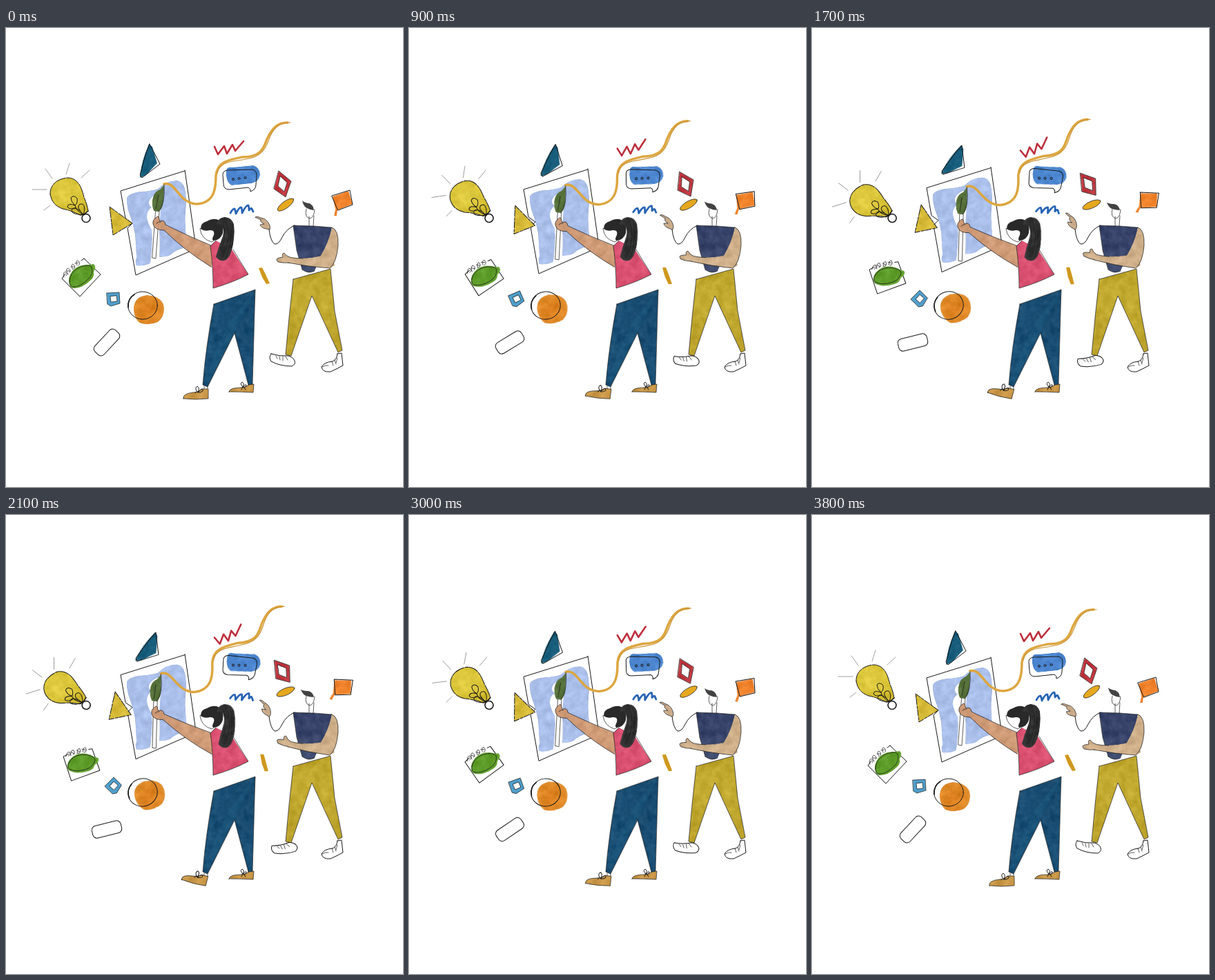
Animation, 575 px wide and 665 px high, one loop 3900 ms. Source, as an HTML page:

```html
<!DOCTYPE html>
<html lang="en">
<head>
<meta charset="utf-8">
<title>Creative team</title>
<style>
html, body { margin: 0; width: 100%; height: 100%; overflow: hidden; background: #fff; }
svg { display: block; width: 575px; height: 665px; }
path, circle, ellipse { stroke-linecap: round; stroke-linejoin: round; }
.ink { fill: none; stroke: #1a1a1a; stroke-width: 1; }
.white { fill: #fff; }
.bold { stroke-width: 1.6; }
.thin { stroke-width: .7; }
.ray { fill: none; stroke: #8a8a8a; stroke-width: .8; }
.wash { filter: url(#paint); }
</style>
</head>
<body>
<svg viewBox="0 0 575 665">
<defs>
  <!-- soft watercolour mottling inside a shape -->
  <filter id="paint" color-interpolation-filters="sRGB">
    <feTurbulence type="fractalNoise" baseFrequency=".09" numOctaves="3" seed="4"/>
    <feColorMatrix values="1 0 0 0 0  1 0 0 0 0  1 0 0 0 0  0 0 0 0 1"/>
    <feComposite operator="arithmetic" in="SourceGraphic" k2="1" k3=".16" k4="-.08" in2=""/>
    <feComposite operator="in" in2="SourceGraphic"/>
  </filter>
  <linearGradient id="denim" x1="0" y1="0" x2="1" y2=".6">
    <stop offset="0" stop-color="#163f5e"/><stop offset=".35" stop-color="#1a4f75"/><stop offset=".7" stop-color="#194b6f"/><stop offset="1" stop-color="#1a4f76"/>
  </linearGradient>
  <linearGradient id="ochre" x1="0" y1="0" x2="0" y2="1">
    <stop offset="0" stop-color="#bba228"/><stop offset=".3" stop-color="#c4ac32"/><stop offset="1" stop-color="#b99f28"/>
  </linearGradient>
  <linearGradient id="navy" x1="0" y1="0" x2="0" y2="1">
    <stop offset="0" stop-color="#333f66"/><stop offset=".6" stop-color="#3a466b"/><stop offset="1" stop-color="#434f73"/>
  </linearGradient>
  <radialGradient id="glow" cx=".35" cy=".4" r=".7">
    <stop offset="0" stop-color="#e0cc42"/><stop offset="1" stop-color="#d5be30"/>
  </radialGradient>
  <radialGradient id="peach" cx=".45" cy=".55" r=".6">
    <stop offset="0" stop-color="#d97a18"/><stop offset="1" stop-color="#e59130"/>
  </radialGradient>
</defs>

<!-- easel sheet -->
<g data-y="-4.5">
  <path class="wash" fill="#aabfea" d="M175 246Q178 239 196 237Q210 236 220 233Q232 221 247 221Q258 222 260 238Q262 252 260 266Q259 285 261 300Q262 313 257 319Q245 322 238 329Q232 332 222 332Q223 310 222 294L212 292Q212 320 209 341Q198 346 189 344Q186 340 189 333Q188 318 187 300Q183 280 178 268Q174 254 175 246Z"/>
  <path class="white" d="M220 240Q212 243 208 249Q205 256 211 260Q204 264 204 274Q206 285 211 292Q213 318 211 334L220 334L222 290L224 262Z"/>
  <path class="ink" stroke-width="1.200" d="M259 207L166 236L173 276L183 283L176 290L188 358L240 335L277 319M259 206Q267 260 275 318"/>
</g>

<!-- yellow triangle -->
<g data-r="20 163 281">
  <path class="wash" fill="#d6ba37" d="M150 259L183 283L155 300Z"/>
  <path class="ink" stroke-dasharray="9 1.5 4 2" d="M150 259L183 283L155 300Z"/>
</g>

<!-- light bulb -->
<g data-r="-17.8 116 275">
  <path class="ray" d="M38 234L59 234M57 204L67 218M92 196L87 212M121 206L109 217M55 264L64 257"/>
  <path class="wash" fill="url(#glow)" d="M64 241C63 226 77 217 91 217C107 219 110 235 113 245Q118 257 119 265Q113 272 107 271Q96 265 82 262Q66 257 64 241Z"/>
  <path class="ink" d="M64 241C63 226 77 217 91 217C107 219 110 235 113 245Q118 257 119 265M64 241Q66 256 82 262Q97 265 107 271" stroke-dasharray="14 1.5 5 1"/>
  <path class="ink" d="M112 270Q101 265 100 257Q94 252 94 246Q98 241 103 247Q104 254 100 257Q90 253 89 259Q92 264 101 261M112 270Q99 271 95 266Q95 260 101 261Q107 264 112 270Q116 260 111 255Q104 254 105 261Q108 267 112 270"/>
  <path class="ink bold" d="M108 271Q113 271 119 265"/>
  <circle class="ink white bold" cx="116" cy="275.5" r="6"/>
</g>

<!-- teal triangle -->
<g data-r="21 207 194">
  <path class="wash" fill="#1a5f7e" d="M207 168L212 172L219 196L202 214L194 217Q195 200 201 183Z"/>
  <path class="ink" d="M208 168L223 197L197 217L194 213L203 181Z"/>
</g>

<!-- notepad -->
<g data-r="27.5 109 361">
  <path class="ink" d="M113 334L137 357L107 389L81 363L86 356M109 337L113 334"/>
  <path class="wash" fill="#5f9e2b" d="M91 368Q90 358 99 349Q108 342 119 343L127 342Q132 346 127 353Q129 361 121 367Q109 378 97 377Q91 375 91 367Z"/>
  <path class="ink thin" stroke="#284a18" d="M92 367Q92 356 104 348Q118 341 124 346Q127 356 119 364Q107 376 96 375Q92 373 92 367Z"/>
  <path class="ink thin" d="M84 361Q82 354 86 353Q90 356 87 359M90 357Q85 349 90 348Q95 351 92 354M97 350Q93 343 97 342Q102 346 98 349M103 344Q100 337 104 337Q109 341 105 344M88 352L93 352M94 346L99 346M100 341L105 340"/>
</g>

<!-- blue ring square -->
<g data-r="-43 156 392">
  <path fill="#4f9fcc" fill-rule="evenodd" d="M146 384L164 383L165 399L152 403L147 400ZM151 389L152 397L161 396L160 388Z"/>
  <path class="ink thin" stroke="#1d4a66" d="M146 384L164 383L165 399L152 403L147 400ZM151 389L152 397L161 396L160 388Z"/>
</g>

<!-- white capsule -->
<g data-r="34 146 455.5">
  <rect class="ink" x="124.500" y="446.500" width="43" height="18" rx="6" transform="rotate(-47 146 455.500)"/>
</g>

<!-- orange disc -->
<g data-r="-17 198 402">
  <path class="wash" fill="url(#peach)" d="M185 404Q187 389 204 387Q222 388 228 400Q232 416 220 426Q207 432 193 427Q184 418 185 404Z"/>
  <ellipse class="ink" stroke-width="1.500" cx="198" cy="402" rx="21.300" ry="20"/>
  <path class="ink bold" d="M177 405Q176 392 186 386"/>
</g>

<!-- red zigzag -->
<g data-r="-16 322 175">
  <path fill="none" stroke="#bd2f3c" stroke-width="2.600" d="M302 172L307 183L316 171L320 182L328 169L332 178L344 164"/>
</g>

<!-- speech bubble -->
<g data-r="8 340 218">
  <path class="wash" fill="#4b85cf" d="M319 207Q319 201 328 202L358 199Q368 202 368 213Q367 222 356 225L327 228Q318 224 319 207Z"/>
  <path class="ink" d="M314 212Q314 207 321 206L356 205Q363 206 363 213L362 227Q362 234 354 237Q355 233 351 231L323 234Q315 234 315 226Z"/>
  <g class="ink"><circle cx="329" cy="219" r="1.500"/><circle cx="337.500" cy="218" r="1.500"/><circle cx="346.500" cy="217" r="1.500"/></g>
</g>

<!-- blue squiggle -->
<g data-r="9 341 264">
  <path fill="none" stroke="#2763b4" stroke-width="2.800" d="M325 268Q329 261 331 262Q333 266 333 269Q338 259 341 260Q342 264 342 268Q348 256 351 257Q352 260 352 264Q355 260 356 262L358 266"/>
</g>

<!-- red frame -->
<g data-r="-21 401 226.500">
  <path class="wash" fill="#c2363f" fill-rule="evenodd" d="M395 207L413 222L405 245L388 233ZM397 215L394 229L403 237L407 224Z"/>
  <path class="ink thin" d="M395 207L413 222L405 245L388 233ZM397 215L394 229L403 237L407 224Z"/>
</g>

<!-- small ellipse -->
<g data-r="13 405 256">
  <ellipse cx="405" cy="256" rx="14" ry="4.800" transform="rotate(-36 405 256)" fill="#e5a81f"/>
  <ellipse class="ink thin" cx="405" cy="256" rx="14" ry="5" transform="rotate(-36 405 256)" stroke="#6c5015"/>
</g>

<!-- gold bar -->
<g data-r="11 374 359">
  <path fill="#cf981e" d="M366 348L371 347L376 357L382 370L377 371L371 361Z"/>
</g>

<!-- orange square -->
<g data-r="20 488 250">
  <path class="wash" fill="#f0822b" d="M473 244L496 236L502 255L480 264L479 272L475 272L477 263Z"/>
  <path class="ink" d="M472 243L498 235L502 256L481 264Z"/>
</g>

<!-- painting arm, brush and ribbon -->
<g data-r="-2.700 306 328">
  <path fill="none" stroke="#dda63f" stroke-width="3.500" d="M229 226C246 221 250 255 277 255C302 253 304 232 304 214C306 194 322 191 342 187C371 187 373 173 378 161C386 144 394 137 408 137"/>
  <path fill="none" stroke="#c99338" stroke-width="1.200" d="M306 210C310 192 329 194 347 190C374 187 378 169 383 156C390 141 399 137 412 137"/>
  <path class="ink white thin" d="M217 265L222 265L217 334L212 333Z"/>
  <path class="wash" fill="#56713a" d="M229 227Q229 239 228 250Q227 262 221 266L214 265Q210 255 213 245Q216 236 223 234Z"/>
  <path class="ink thin" stroke="#33451f" d="M229 227Q230 240 228 250Q225 262 221 266M221 242L217 262"/>
  <path class="wash" fill="#d09b77" d="M217 275Q221 270 222 277L223 280Q230 277 231 285Q265 302 299 316L298 347Q258 322 229 293Q215 293 213 284Q212 278 217 275Z"/>
  <path class="ink thin" d="M297 315Q265 302 231 285Q230 277 223 280L222 277Q221 270 217 275Q212 278 213 284Q215 293 229 293Q258 322 297 346M218 283Q221 280 224 281"/>
</g>

<!-- painter -->
<path class="wash" fill="#d95070" d="M296 316L304 308L326 319L351 357Q328 369 300 377Q300 345 296 316Z"/>
<path class="ink thin" d="M296 316Q300 345 300 377Q328 369 351 357L329 321M296 316L304 308"/>
<path class="ink white thin" d="M281 291Q283 306 298 310L309 303L303 290Z"/>
<path fill="#2a292a" d="M282 291Q282 282 291 280Q302 274 309 279Q316 285 314 297Q311 307 301 308Q297 307 301 300Q303 292 295 293Q287 295 282 291Z"/>
<g data-r="-4 318 279">
  <path class="wash" fill="#333233" d="M305 284Q307 275 316 274Q326 273 330 284Q332 297 329 314Q326 330 319 336Q309 340 304 331Q307 319 312 307Q317 296 313 286Z"/>
  <path fill="none" stroke="#1f1f1f" stroke-width=".700" d="M319 279Q328 302 314 331M324 278Q330 306 319 332M314 284Q322 303 308 327"/>
</g>
<path class="wash" fill="url(#denim)" d="M301 400L361 379L360 410L357 516L351 517L331 442L292 520L285 517Q289 465 301 400Z"/>
<path fill="#226a94" opacity=".22" d="M359 383L331 441L296 508L288 512Q312 430 359 383Z"/>
<path class="ink thin" d="M301 400L361 379L360 410L357 516L351 517L331 442L292 520L285 517Q289 465 301 400Z"/>
<path class="ink thin" d="M287 519L287 523M292 520L292 524M351 517L351 519"/>
<g data-r="15 290 522">
  <path class="wash" fill="#c99747" d="M257 537Q255 530 271 528Q278 528 284 523L293 523L293 537Q275 539 257 537Z"/>
  <path class="ink thin" d="M257 537Q255 530 271 528Q278 528 284 523L293 523L293 537Q275 539 257 537Z"/>
  <path class="ink" d="M278 528Q272 522 277 519Q281 521 278 528Q286 519 285 526Q281 529 278 528M276 527L274 529"/>
</g>
<path class="wash" fill="#c99747" d="M323 527Q324 521 340 521Q348 520 352 517L359 516L358 528Q340 527 323 527Z"/>
<path class="ink thin" d="M323 527Q324 521 340 521Q348 520 352 517L359 516L358 528Q340 527 323 527Z"/>
<path class="ink" d="M343 520Q338 515 342 513Q346 515 343 520Q349 514 348 519Q346 522 343 520L341 524M344 520L347 524"/>

<!-- colleague -->
<path class="ink white thin" d="M439 273L439 287M446 272L445 287M435 262Q432 274 440 276Q446 275 447 263"/>
<g data-r="-11 443 263">
  <path fill="#434243" d="M429 250Q432 253 439 254Q445 256 446 264Q441 264 436 261Q431 259 429 250Z"/>
</g>
<path class="ink" d="M418 286Q406 291 400 303Q395 314 389 313Q383 309 381 292"/>
<g data-r="20 381 290">
  <path class="wash" fill="#cdad8c" d="M361 274Q363 272 369 275Q376 276 380 282Q384 288 382 292L377 291Q370 290 368 285L374 284Q367 281 369 278Z"/>
  <path class="ink thin" d="M361 274Q363 272 369 275Q376 276 380 282Q384 288 382 292L377 291Q370 290 368 285L374 284Q367 281 369 278Z"/>
</g>
<path class="wash" fill="url(#navy)" d="M416 286L446 287L472 289L469 305L456 331L447 352Q438 357 429 350L421 322Z"/>
<path class="ink thin" d="M429 350L421 322L416 286L446 287L472 289M429 350Q438 357 447 352"/>
<g data-r="4 470 336">
  <path class="wash" fill="#cfb08b" d="M410 332Q434 336 456 330L473 330L476 344L469 348Q438 346 408 340Z"/>
  <path class="ink thin" d="M410 332Q420 334 430 334M469 348Q438 346 408 340"/>
  <g data-r="11 411 335">
    <path class="wash" fill="#cfb08b" d="M412 332Q405 330 403 326Q399 326 401 332Q391 333 392 336L394 339Q403 341 411 340Z"/>
    <path class="ink thin" d="M411 332Q405 330 403 326Q399 326 401 332Q391 333 392 336L394 339Q403 341 410 340"/>
  </g>
</g>
<path class="wash" fill="#cfb08b" d="M472 289Q482 292 481 315Q479 340 469 348L456 342L455 331Q466 314 472 289Z"/>
<path class="ink thin" d="M472 289Q482 292 481 315Q479 340 469 348"/>
<path class="wash" fill="url(#ochre)" d="M416 364L470 349L476 410L487 467L481 470L443 388L413 475L405 473Q410 416 416 364Z"/>
<path class="ink thin" d="M416 364L470 349L476 410L487 467L481 470L443 388L413 475L405 473Q410 416 416 364Z"/>
<g data-r="-18 408 472">
  <path class="ink white" d="M384 472Q380 477 384 483Q397 490 414 490Q420 487 418 482Q416 477 409 475Q396 476 384 472Z"/>
  <path class="ink thin" d="M391 475L393 479M396 476L397 481M401 476L401 482M405 476L408 481"/>
</g>
<path class="ink white" d="M480 472L486 471L488 489Q479 494 470 498Q458 499 457 491Q461 484 473 483Q479 481 480 472Z"/>
<path class="ink thin" d="M472 483L474 489M476 481L478 487M480 478L478 485M458 491Q463 488 467 489"/>
</svg>
<script>
const PERIOD = 3800, LOOP = 3900, STEP = 100;
const turns = [...document.querySelectorAll('[data-r]')].map(el => [el, el.dataset.r.split(' ').map(Number)]);
const shifts = [...document.querySelectorAll('[data-y]')].map(el => [el, Number(el.dataset.y)]);

// name the noise input of the blend explicitly
const [noise, tint, blend] = document.querySelector('#paint').children;
noise.setAttribute('result', 'noise');
tint.setAttribute('in', 'noise');
tint.setAttribute('result', 'grain');
blend.setAttribute('in2', 'grain');

function draw(ms) {
  const t = Math.floor((ms % LOOP) / STEP) * STEP;
  const p = (1 - Math.cos(2 * Math.PI * t / PERIOD)) / 2;
  for (const [el, [angle, x, y]] of turns) el.setAttribute('transform', `rotate(${angle * p} ${x} ${y})`);
  for (const [el, dy] of shifts) el.setAttribute('transform', `translate(0 ${dy * p})`);
}

const start = performance.now();
function tick() {
  draw(performance.now() - start);
  requestAnimationFrame(tick);
}
tick();
</script>
</body>
</html>
```
